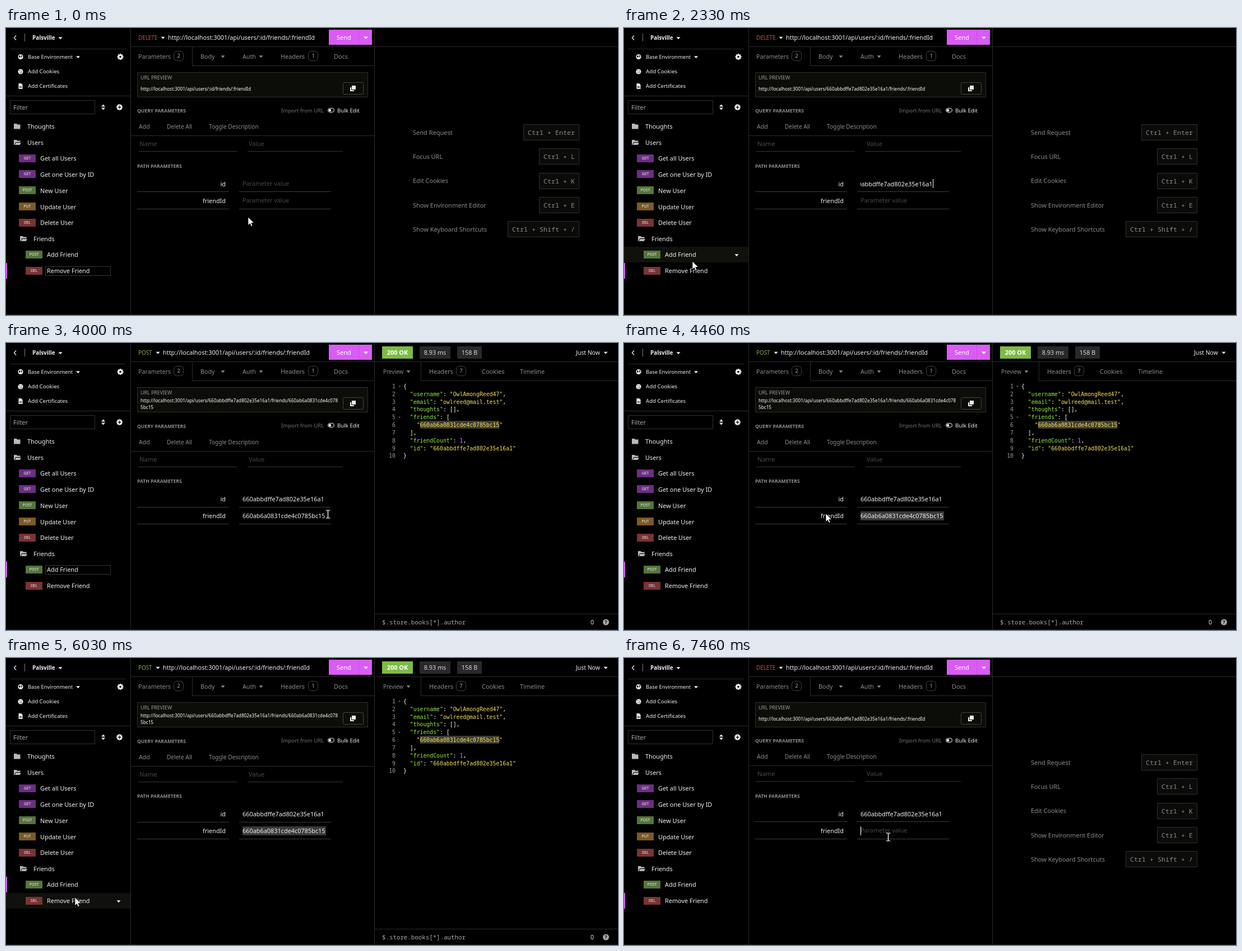
Recreate the animation shown at these times as an HTML page with a canvas. Size 1092x513 px, loop 8000 ms.

```html
<!DOCTYPE html>
<html lang="en">
<head>
<meta charset="utf-8">
<title>API client</title>
<style>
html, body { margin: 0; width: 100%; height: 100%; overflow: hidden; background: #000; }
canvas { display: block; }
</style>
</head>
<body>
<canvas id="stage" width="1092" height="513"></canvas>
<script>
const ctx = document.getElementById('stage').getContext('2d');
const LOOP = 8000;
const SANS = '"Noto Sans", "Open Sans", sans-serif';
const MONO = '"Noto Sans Mono", "DejaVu Sans Mono", monospace';
const CODE = '"DejaVu Sans Mono", "Noto Sans Mono", monospace';
const WHITE = '#f0f0f0', GRAY = '#8c8c8c', DIM = '#484848', LINE = '#2b2b2b', PINK = '#d95cf5';
const BADGE = { GET: '#6c2f82', POST: '#55753a', PUT: '#7b5a26', DEL: '#783335' };

const USER_ID = '660abbdffe7ad802e35e16a1';
const FRIEND_ID = '660ab6a0831cde4c0785bc15';
const BASE = 'http://localhost:3001/api/users/';

// Pointer path: time, x, y
const PATH = [
  [0, 432, 338], [30, 432, 338], [250, 458, 309], [470, 481, 282], [560, 482, 280],
  [1300, 482, 280], [1500, 420, 305], [1800, 230, 375], [2060, 136, 410], [2330, 122, 417],
  [2900, 116, 411], [3050, 116, 409], [3250, 320, 360], [3500, 560, 309], [3660, 568, 308],
  [4000, 574, 306], [4060, 574, 306], [4250, 480, 307], [4460, 361, 305], [4630, 262, 312],
  [4800, 262, 313], [4830, 261, 313], [5230, 261, 313], [5400, 270, 313], [5700, 190, 375],
  [5960, 124, 428], [6130, 122, 429], [6270, 250, 395], [6400, 377, 364], [6860, 446, 336],
  [7200, 470, 317], [7360, 470, 318], [7460, 471, 320], [LOOP, 471, 320]
];

// Sidebar rows: label, centre y, indent x, method (none for folders), open folder
const ROWS = [
  ['Thoughts', 176, 14, '', false], ['Users', 205, 14, '', true],
  ['Get all Users', 233.5, 23, 'GET'], ['Get one User by ID', 262, 23, 'GET'],
  ['New User', 291, 23, 'POST'], ['Update User', 320, 23, 'PUT'], ['Delete User', 348.5, 23, 'DEL'],
  ['Friends', 377, 25, '', true], ['Add Friend', 405.5, 35, 'POST'], ['Remove Friend', 434.5, 35, 'DEL']
];
const SHORTCUTS = [
  ['Send Request', 'Ctrl + Enter', 923], ['Focus URL', 'Ctrl + L', 951], ['Edit Cookies', 'Ctrl + K', 951],
  ['Show Environment Editor', 'Ctrl + E', 951], ['Show Keyboard Shortcuts', 'Ctrl + Shift + /', 895]
];
// Each token starts with its colour key: w white, k key, s string, n number
const JSON_LINES = [
  ['w{'], ['k  "username"', 'w: ', 's"OwlAmongReed47"', 'w,'],
  ['k  "email"', 'w: ', 's"owlreed@mail.test"', 'w,'], ['k  "thoughts"', 'w: [],'],
  ['k  "friends"', 'w: ['], [`s    "${FRIEND_ID}"`], ['w  ],'],
  ['k  "friendCount"', 'w: ', 'n1', 'w,'], ['k  "id"', 'w: ', `s"${USER_ID}"`], ['w}']
];
const TOKEN = { w: '#f8f8f8', k: '#93ee4a', s: '#f4e05a', n: '#d77ffb' };

const between = (t, a, b) => t >= a && t < b;

function text(s, x, y, size = 11, color = WHITE, { weight = 400, align = 'left', font = SANS } = {}) {
  ctx.font = `${weight} ${size}px ${font}`;
  ctx.textAlign = align;
  ctx.fillStyle = color;
  ctx.fillText(s, x, Math.round(y + size * 0.36));
}
function rect(x, y, w, h, color) {
  ctx.fillStyle = color;
  ctx.fillRect(x, y, w, h);
}
function box(x, y, w, h, stroke, fill, r = 0) {
  ctx.beginPath();
  ctx.roundRect(x + 0.5, y + 0.5, w - 1, h - 1, r);
  if (fill) { ctx.fillStyle = fill; ctx.fill(); }
  ctx.lineWidth = 1;
  ctx.strokeStyle = stroke;
  ctx.stroke();
}
const hline = (x1, x2, y, color = LINE) => rect(x1, y, x2 - x1, 1, color);
const vline = (x, y1, y2, color = LINE) => rect(x, y1, 1, y2 - y1, color);

function poly(points, fill, stroke, width = 1) {
  ctx.beginPath();
  points.forEach(([x, y]) => ctx.lineTo(x, y));
  if (fill) { ctx.closePath(); ctx.fillStyle = fill; ctx.fill(); }
  if (stroke) { ctx.lineWidth = width; ctx.strokeStyle = stroke; ctx.stroke(); }
}
function disc(x, y, r, color) {
  ctx.beginPath();
  ctx.arc(x, y, r, 0, Math.PI * 2);
  ctx.fillStyle = color;
  ctx.fill();
}
const drop = (x, y, color = WHITE, s = 3.5) =>
  poly([[x - s, y - s / 2], [x + s, y - s / 2], [x, y + s / 2 + 0.5]], color);

function pill(n, x, y) {
  box(x, y - 9, 18, 18, '#424242', '', 5);
  text(n, x + 9, y, 9, '#b5b5b5', { align: 'center' });
}

function folder(x, y, open) {
  const c = '#b9b9b9';
  poly([[x, y - 5], [x + 5, y - 5], [x + 6, y - 3.5], [x + 11.5, y - 3.5], [x + 11.5, y + 4.5], [x, y + 4.5]], c);
  if (!open) return;
  poly([[x + 1, y + 4.5], [x + 3.5, y - 0.5], [x + 13.5, y - 0.5], [x + 11, y + 4.5]], c, '#000');
}

function gear(x, y) {
  ctx.save();
  ctx.translate(x, y);
  for (let i = 0; i < 4; i++) {
    rect(-1.3, -5.5, 2.6, 11, WHITE);
    ctx.rotate(Math.PI / 4);
  }
  ctx.restore();
  disc(x, y, 4, WHITE);
  disc(x, y, 1.7, '#000');
}

function sideIcons() {
  poly([[18, 13.5], [14.5, 17.5], [18, 21.5]], '', WHITE, 1.3);
  vline(33, 10, 24, '#777');
  disc(26, 51.5, 4.6, WHITE);
  poly([[23, 49], [26, 50], [25, 53], [23, 52]], '#000');
  poly([[27, 48], [29, 50], [28, 53], [27, 52]], '#222');
  disc(26, 78, 4.6, WHITE);
  [[24.5, 76.5], [27.6, 77], [25, 80], [28, 80]].forEach(([x, y]) => disc(x, y, 0.8, '#000'));
  poly([[22.5, 99], [27, 99], [29.5, 101.5], [29.5, 109], [22.5, 109]], WHITE);
  hline(24, 28, 104, '#000');
  hline(24, 28, 106, '#000');
  gear(204, 51.5);
  poly([[170, 140.5], [173.5, 136.5], [177, 140.5]], WHITE);
  poly([[170, 142.5], [173.5, 146.5], [177, 142.5]], WHITE);
  disc(202.5, 141.5, 5.2, WHITE);
  rect(199.5, 141, 6, 1.2, '#000');
  rect(202, 138.5, 1.2, 6, '#000');
}

function sidebar(s) {
  sideIcons();
  text('Palsville', 47, 17, 9.9, WHITE, { weight: 700 });
  drop(97, 18);
  hline(7, 214, 37);
  text('Base Environment', 39, 51.5, 9.4);
  drop(128.5, 52);
  text('Add Cookies', 39, 78, 9.7);
  text('Add Certificates', 39, 104, 9.6);
  hline(0, 222, 121);
  box(7, 129, 152, 25, '#303030');
  text('Filter', 13, 142, 11, '#a8a8a8');

  for (const [label, y, x, method, open] of ROWS) {
    const top = Math.round(y - 14.5);
    if (s.x < 222 && s.y >= top && s.y < top + 29) {
      rect(0, top, 222, 28, '#10110c');
      drop(201, y + 0.5);
    }
    if (label === s.active) rect(0, top, 2, 28, PINK);
    if (method) {
      rect(x, Math.floor(y - 7.5), 30, 14, BADGE[method]);
      text(method, x + 15, y - 1, 6.7, '#f2f2f2', { align: 'center', weight: 500 });
      if (label === s.focus) box(70, Math.round(y - 9), 117, 17, '#363636', '#000');
      text(label, x + 38, y, 10.9);
    } else {
      folder(x, y, open);
      text(label, x + 24, y, 10.9);
    }
  }
}

function copyIcon(color) {
  rect(614, 106, 7, 7, color);
  box(616, 102, 9, 9, '#0c0d08', color);
}

function requestPane(s) {
  const d = s.add ? 1 : 0;
  const method = s.add ? 'POST' : 'DELETE';
  text(method, 236, 17, 9.9, s.add ? '#7fae4f' : '#c44f43');
  drop(s.add ? 271 : 280, 17.5);
  text(BASE + ':id/friends/:friendId', s.add ? 280 : 289, 17, 10.9);
  rect(576, 3, 77, 27, PINK);
  vline(629, 3, 30, '#c64fe0');
  text('Send', 590, 17.5, 11, '#fff');
  drop(642, 17.5, '#fff', 4);

  text('Parameters', 236, 51, 10.7, GRAY);
  pill('2', 299, 50);
  vline(332, 34, 67);
  hline(332, 657, 67);
  text('Body', 347, 51, 10.7, GRAY);
  drop(387, 51, GRAY);
  text('Auth', 422, 51, 10.7, GRAY);
  drop(455, 51, GRAY);
  text('Headers', 490, 51, 10.9, GRAY);
  pill('1', 539, 50);
  text('Docs', 585, 51, 10.9, GRAY);

  box(234, 79, 412, 45, '#2e2e25', '#0c0d08');
  text('URL PREVIEW', 240, 88.5, 8.9, '#9a9a9a');
  const single = s.preview.length === 1;
  s.preview.forEach((line, i) =>
    text(line, 240, single ? 109 : 103.5 + i * 12, 8.2, s.loading ? GRAY : '#fff', { weight: 500 }));
  box(601, 97, 37, 22, '#45453f', '', 2);
  copyIcon(s.loading ? '#8f8f8f' : '#f0f0f0');

  text('QUERY PARAMETERS', 234, 147.5 + d, 8.6, GRAY, { weight: 700 });
  text('Import from URL', 491, 147.5, 9.6, '#747474');
  box(574, 143, 12, 8, WHITE, '', 4);
  disc(578, 147, 2.3, WHITE);
  text('Bulk Edit', 591, 147.5, 9.7);
  text('Add', 237, 176 + d, 10.5, GRAY);
  text('Delete All', 287, 176 + d, 10.1, GRAY);
  text('Toggle Description', 362, 176 + d, 10.1, GRAY);
  hline(222, 657, 192 + d);
  text('Name', 238, 207 + d, 11.2, DIM);
  text('Value', 433, 207 + d, 10.9, DIM);
  hline(236, 412, 220 + d, '#363636');
  hline(431, 601, 220 + d, '#363636');

  text('PATH PARAMETERS', 234, 247, 8.6, GRAY, { weight: 700 });
  text('id', 392, 279 + d * 0.5, 10.9, WHITE, { align: 'right' });
  text('friendId', 392, 309, 10.9, WHITE, { align: 'right' });
  for (const y of [292 + d, 323]) {
    hline(234, 398, y, '#3c3c3c');
    hline(416, 580, y, '#3c3c3c');
  }
  if (s.selectFrom < 571) rect(s.selectFrom, 301, 571 - s.selectFrom, 16, '#3a3a3a');
  field(s.id, 279, s.scrolled);
  field(s.add ? FRIEND_ID : '', 309, false);
  if (s.caret) vline(s.caret[0], s.caret[1], s.caret[1] + 16, '#fff');
}

function field(value, y, scrolled) {
  if (!value) return text('Parameter value', 422, y - 0.5, 10.8, DIM);
  ctx.save();
  ctx.beginPath();
  ctx.rect(422, y - 12, 158, 24);
  ctx.clip();
  if (scrolled) text(value, 550.5, y, 10.9, WHITE, { align: 'right' });
  else text(value, 422, y, 10.9);
  ctx.restore();
}

function shortcutPane() {
  SHORTCUTS.forEach(([label, keys, x], i) => {
    const y = 187 + i * 43.25;
    text(label, 726, y, 11, GRAY);
    box(x, Math.round(y - 15), 1023 - x, 29, '#303030', '#0b0b09');
    text(keys, (x + 1023) / 2, y, 11.67, GRAY, { align: 'center', font: MONO });
  });
}

function responsePane() {
  rect(671, 6, 55, 22, '#7dbb45');
  text('200 OK', 698.5, 17, 10.9, '#fff', { weight: 600, align: 'center' });
  rect(738, 6, 55, 22, '#292929');
  text('8.93 ms', 765.5, 17, 10.8, '#d8d8d8', { align: 'center' });
  rect(805, 6, 44, 22, '#292929');
  text('158 B', 827, 17, 10.9, '#d8d8d8', { align: 'center' });
  text('Just Now', 1017, 17, 10.4);
  drop(1070, 17.5);

  text('Preview', 673, 51, 9.9, GRAY);
  drop(718, 51, GRAY);
  vline(740, 34, 67);
  hline(740, 1092, 67);
  text('Headers', 755, 51, 10.9, GRAY);
  pill('7', 803, 50);
  text('Cookies', 849, 51, 11, GRAY);
  text('Timeline', 917, 51, 11, GRAY);

  const step = 5.91;
  rect(709 + step * 5, 139, step * 24, 14, '#3f3d33');
  JSON_LINES.forEach((tokens, i) => {
    const y = 77.5 + i * 13.82;
    text(i + 1, 695, y, 9.82, '#999', { align: 'right', font: CODE });
    if (i === 0 || i === 4) drop(702, y, '#666', 2);
    let x = 709;
    for (const token of tokens) {
      const str = token.slice(1);
      text(str, x, y, 9.82, TOKEN[token[0]], { font: CODE });
      x += str.length * step;
    }
  });
  hline(658, 1092, 484);
  text('$.store.books[*].author', 671, 499, 10.8, '#a8a8a8', { font: MONO });
  text('0', 1046, 499.5, 10.5, WHITE, { align: 'center' });
  disc(1070.5, 499, 5.5, '#a5a5a5');
  text('?', 1070.5, 499, 8.5, '#000', { weight: 700, align: 'center' });
}

function pointer(x, y) {
  const inField = x >= 416 && x <= 580 && (between(y, 267, 293) || between(y, 299, 324));
  if (inField) {
    const beam = [[-4, -7], [-1, -7], [0, -6], [0, 6], [-1, 7], [-4, 7]];
    const place = k => beam.map(([a, b]) => [x + 0.5 + a * k, y + b]);
    poly(place(1), '', '#fff', 1.2);
    poly(place(-1), '', '#fff', 1.2);
    return;
  }
  const arrow = [[0, 0], [0, 14.5], [3.4, 11.4], [5.8, 16.6], [8, 15.6], [5.7, 10.5], [10.4, 10.3]];
  const shape = arrow.map(([a, b]) => [x + a, y + b]);
  poly([...shape, shape[0]], '#fff', '#000', 0.7);
}

function pointerAt(t) {
  const i = PATH.findIndex(p => p[0] > t);
  const [t0, x0, y0] = PATH[i - 1], [t1, x1, y1] = PATH[i];
  const k = (t - t0) / (t1 - t0);
  return [Math.round(x0 + (x1 - x0) * k), Math.round(y0 + (y1 - y0) * k)];
}

function caretAt(t) {
  if (between(t, 460, 960)) return [422, 270];
  if (between(t, 1260, 3000) && (t - 1260) % 1000 < 500) return [551, 270];
  // The blink restarts shortly before the pointer reaches the row below
  if (between(t, 2300, 2330 + 430)) return [551, 270];
  if (t >= 7360) return [422, 301];
  return null;
}

function previewAt(t, add) {
  if (add) return [`${BASE}${USER_ID}/friends/${FRIEND_ID.slice(0, 19)}`, FRIEND_ID.slice(19)];
  if (between(t, 6200, 6550)) return ['_'];
  return [`${BASE}${t < 1320 ? ':id' : USER_ID}/friends/:friendId`];
}

function stateAt(t) {
  const [x, y] = pointerAt(t);
  const add = between(t, 3080, 6200);
  let focus = '';
  if (t < 460 || between(t, 6080, 7150)) focus = 'Remove Friend';
  if (between(t, 3000, 4050)) focus = 'Add Friend';
  return {
    x, y, add, focus,
    active: between(t, 3200, 6500) ? 'Add Friend' : 'Remove Friend',
    id: t < 1260 ? '' : USER_ID,
    scrolled: t < 3000,
    preview: previewAt(t, add),
    loading: between(t, 6200, 6550),
    selectFrom: add && t >= 4060 ? (t < 4500 ? Math.max(422, x) : 422) : 571,
    caret: caretAt(t)
  };
}

function draw(t) {
  const s = stateAt(t);
  rect(0, 0, 1092, 513, '#000');
  sidebar(s);
  vline(222, 0, 513);
  vline(657, 0, 513);
  hline(222, 1092, 33);
  requestPane(s);
  if (s.add) responsePane();
  else shortcutPane();
  hline(0, 1092, 512, '#222');
  pointer(s.x, s.y);
}

const start = performance.now();
function tick() {
  draw((performance.now() - start) % LOOP);
  requestAnimationFrame(tick);
}
tick();
</script>
</body>
</html>
```
